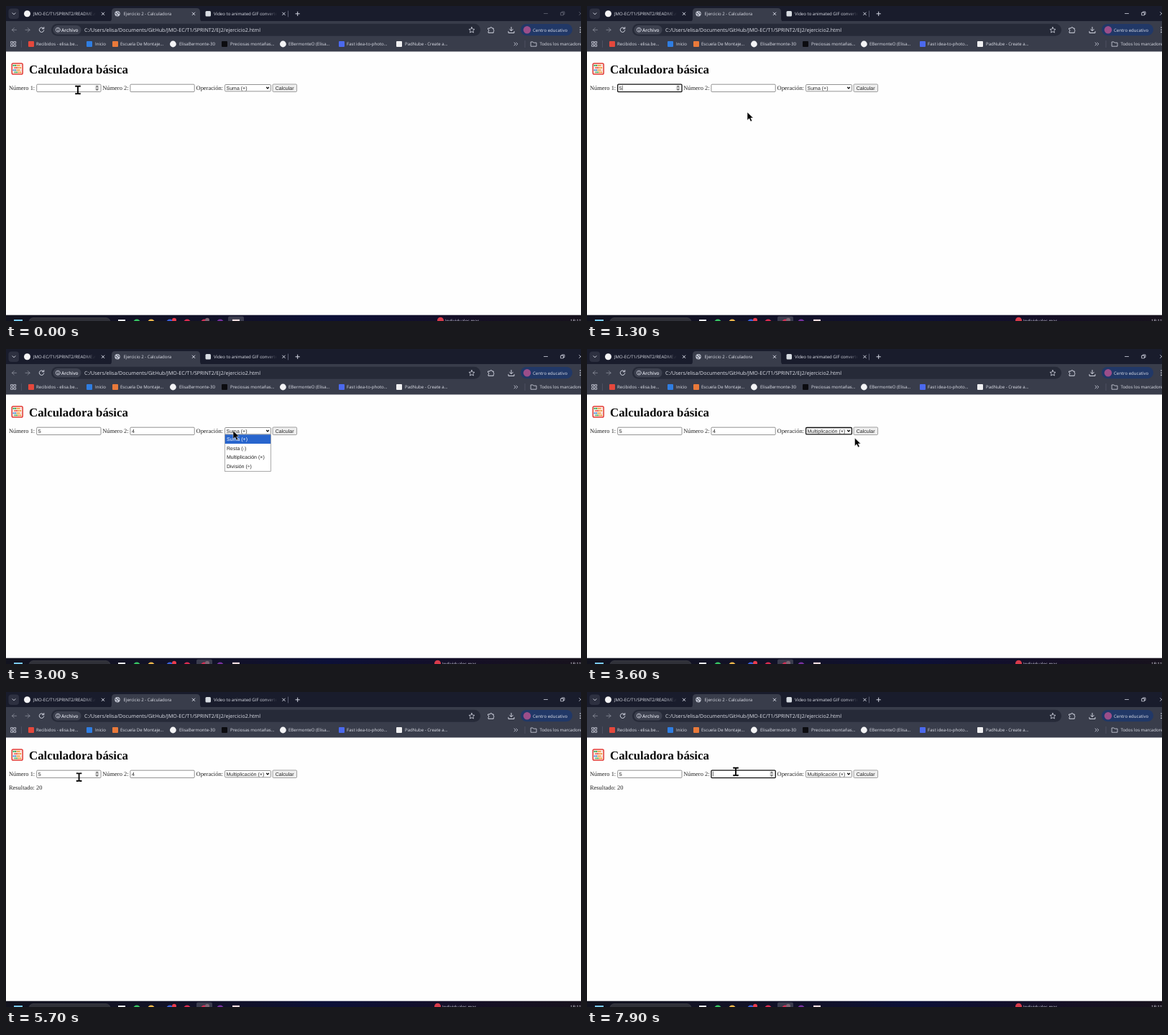
Recreate the animation shown at these times as an HTML page. Size 800 px wide and 439 px high, loop 8 s.

```html
<!DOCTYPE html>
<html lang="es">
<head>
<meta charset="utf-8">
<title>Calculadora</title>
<style>
  html, body { margin: 0; width: 100%; height: 100%; overflow: hidden; background: #fff; }
  svg { display: block; width: 100vw; height: 100vh; }
  text { white-space: pre; text-rendering: geometricPrecision; }
  .ui { font-family: "Open Sans", sans-serif; font-size: 6.07px; fill: #dfe1ea; }
  .serif { font-family: "Liberation Serif", serif; font-size: 8.42px; fill: #222; }
  .form { font-family: "Liberation Sans", sans-serif; font-size: 7px; fill: #222; }
  .line { fill: none; stroke: #d3d6e2; stroke-width: 1; stroke-linecap: round; stroke-linejoin: round; }
</style>
</head>
<body>
<svg viewBox="0 0 800 439" preserveAspectRatio="none">
  <defs>
    <linearGradient id="bar">
      <stop offset="0" stop-color="#12131f"/><stop offset=".42" stop-color="#11112a"/>
      <stop offset=".56" stop-color="#0c1038"/><stop offset=".8" stop-color="#150f26"/>
      <stop offset="1" stop-color="#17121d"/>
    </linearGradient>
    <linearGradient id="fadeStrip">
      <stop offset="0" stop-color="#191c2c" stop-opacity="0"/><stop offset="1" stop-color="#191c2c"/>
    </linearGradient>
  </defs>
  <g id="chrome"></g>
  <g id="page"></g>
  <g id="taskbar"></g>
  <g id="live"></g>
  <path id="arrow" d="M0 0V11.2L2.7 8.8L4.7 13L6.7 12L4.8 8H8.3Z" fill="#050505" stroke="#fff" stroke-width=".5"/>
  <path id="beam" d="M-3.8 -5.3H-1L0 -4.6L1 -5.3H3.8M0 -4.6V4.6M-3.8 5.3H-1L0 4.6L1 5.3H3.8" fill="none" stroke="#080808" stroke-width="1.9"/>
</svg>
<script>
const LOOP = 8000;
const $ = id => document.getElementById(id);

const rect = (x, y, w, h, fill, r = 0, extra = "") =>
  `<rect x="${x}" y="${y}" width="${w}" height="${h}" rx="${r}" fill="${fill}" ${extra}/>`;
const circle = (x, y, r, fill) => `<circle cx="${x}" cy="${y}" r="${r}" fill="${fill}"/>`;
const text = (x, y, s, cls, extra = "") => `<text x="${x}" y="${y}" class="${cls}" ${extra}>${s}</text>`;
const line = (d, extra = "") => `<path class="line" d="${d}" ${extra}/>`;
const cross = x => line(`M${x - 1.8} 9l3.6 3.6m0 -3.6l-3.6 3.6`, 'stroke-width=".9"');
const globe = (x, y) => circle(x, y, 3.7, "#c3c7d4") +
  `<path d="M${x - 3} ${y - 1}l2 1l1 2l-1 1M${x} ${y - 3}l1 2l2 .6" fill="none" stroke="#454957" stroke-width="1"/>`;

function drawChrome() {
  const bookmarks = [
    [31, 42, "Recibidos - elisa.be…", "#e5483c", 0],
    [112, 124, "Inicio", "#2f7de1", 0],
    [148, 159, "Escuela De Montaje…", "#e9793a", 0],
    [228, 241, "ElisaBermonte-30", "#f4f4f6", 1],
    [300, 312, "Preciosas montañas…", "#0c0c10", 0],
    [381, 393, "EBermonteO (Elisa…", "#f4f4f6", 1],
    [463, 474, "Fast idea-to-photo…", "#4b69ee", 0],
    [543, 555, "PadNube - Create a…", "#f0f0f2", 0],
  ];
  const mark = (x, color, round) => round ? circle(x + 4.4, 53, 4.4, color) : rect(x, 49, 8, 8, color, 1);

  $("chrome").innerHTML =
    rect(0, 0, 800, 22, "#191c2c") + rect(0, 21, 800, 43, "#393d4b") +
    // tab strip
    rect(3.5, 3.5, 14.5, 14.5, "#2d3040", 4) + line("M9 9.8l2 2l2 -2") +
    circle(29.5, 10.8, 4.5, "#f4f4f6") + text(38, 13, "JMO-EC/T1/SPRINT2/README.md", "ui") +
    rect(108, 5, 17, 12, "url(#fadeStrip)") + rect(125, 5, 12, 12, "#191c2c") + cross(135) +
    '<path d="M143 22Q147 22 147 17V8Q147 3 152 3H265Q270 3 270 8V17Q270 22 274 22Z" fill="#393d4b"/>' +
    globe(155, 10.8) + text(163.5, 13, "Ejercicio 2 - Calculadora", "ui") + cross(261) +
    rect(277.5, 7, 7.5, 7.5, "#d7dce2", 1.5) + text(289, 13, "Video to animated GIF converter", "ui") +
    rect(361, 5, 16, 12, "url(#fadeStrip)") + rect(377, 5, 14, 12, "#191c2c") + cross(386.5) +
    line("M392.5 7V15", 'stroke="#5a5e70" style="stroke:#5a5e70"') +
    line("M403 10.8h5.4m-2.7 -2.7v5.4") +
    // navigation
    line("M14.5 33.3H8.5m2.8 -2.8l-2.8 2.8l2.8 2.8M27 33.3h6m-2.8 -2.8l2.8 2.8l-2.8 2.8", 'opacity=".42"') +
    line("M52.2 31.2A3.3 3.3 0 1 0 52.8 34M52.8 29.6V31.8H50.4") +
    rect(63, 24.7, 597, 17, "#262a38", 8.5) + rect(65.5, 27, 39, 12.6, "#3d414f", 6.3) +
    line("M72.3 33.2v1.8m0 -3.7v.2", 'stroke-width=".7"') +
    '<circle class="line" cx="72.3" cy="33.2" r="3" style="stroke-width:.8"/>' +
    text(77, 35.5, "Archivo", "ui", 'font-weight="600" style="font-size:6.5px"') +
    text(109, 36, "C:/Users/elisa/Documents/GitHub/JMO-EC/T1/SPRINT2/EJ2/ejercicio2.html", "ui", 'style="font-size:7.13px"') +
    line("M648 29.5l1.15 2.6l2.8 .3l-2.1 1.9l.6 2.8l-2.45 -1.4l-2.45 1.4l.6 -2.8l-2.1 -1.9l2.8 -.3z", 'style="stroke-width:.8"') +
    line("M671 31H673.4a1.4 1.4 0 0 1 2.8 0H678.2V33.2a1.4 1.4 0 0 1 0 2.4V37.3H671V35.4a1.4 1.4 0 0 0 0 -2.6Z") +
    line("M703 29.5v5m-2.2 -2l2.2 2.2l2.2 -2.2M699 35.5V37.5H707V35.5") +
    rect(716, 25, 72, 16.2, "#213867", 8.1) + circle(725, 33.2, 5.2, "#9b4e8a") +
    text(733, 35.6, "Centro educativo", "ui") +
    [30, 33.2, 36.4].map(y => circle(799, y, .8, "#dfe1ea")).join("") +
    // bookmarks
    [7, 11.2].map(x => [49.6, 53.8].map(y => line(`M${x} ${y}h2.5v2.5h-2.5z`, 'style="stroke-width:.8"')).join("")).join("") +
    line("M21.5 48.5V57.5", 'style="stroke:#5d6171;stroke-width:.6"') +
    bookmarks.map(([ix, tx, label, color, round]) => mark(ix, color, round) + text(tx, 55.1, label, "ui")).join("") +
    line("M707 51l2 2l-2 2m2.8 -4l2 2l-2 2", 'style="stroke-width:.8"') +
    line("M722 48.5V57.5", 'style="stroke:#5d6171;stroke-width:.6"') +
    line("M730.5 50h2.5l1 1.2h4v5h-7.5z", 'style="stroke-width:.8"') +
    text(742.5, 55.1, "Todos los marcadores", "ui");
}

function drawPage() {
  const beadRows = [["#2fae5b", 83], ["#e8524a", 86.2], ["#3f8fe0", 89.4], ["#49b867", 92.4]];
  const beads = beadRows.map(([color, y], row) =>
    line(`M9 ${y}H22`, 'style="stroke:#d8a08c;stroke-width:.6"') +
    [0, 1, 2, 3].map(i => circle(10.6 + i * 2.5 + (row % 2) * 2, y, 1.15, i > 1 ? "#f09a3a" : color)).join("")).join("");

  $("page").innerHTML = rect(0, 63.5, 800, 368, "#fefefe") +
    rect(8.2, 80, 15, 15, "#fff2ec", 1.8, 'stroke="#e23a35" stroke-width="1.5"') + beads +
    text(32, 93.7, "Calculadora básica", "serif", 'font-weight="700" style="font-size:16.84px;fill:#080808"') +
    text(4, 117, "Número 1:", "serif") + text(134.3, 117, "Número 2:", "serif") +
    text(264.6, 117, "Operación:", "serif") +
    rect(371, 109, 33.6, 10.6, "#efefef", 1.4, 'stroke="#777" stroke-width=".7"') +
    text(374.8, 116.7, "Calcular", "form");
}

function drawTaskbar(active) {
  const icons = [[182, "#37c463"], [202, "#eab54a"], [228, "#3c62d8"], [252, "#d92c50"],
    [276, "#cf3156"], [298, "#77319e"]];
  $("taskbar").innerHTML = rect(0, 430.7, 800, 9, "url(#bar)") +
    rect(11, 437, 12, 4, "#79c8ee") + rect(32, 434.5, 113, 12, "#303139", 6, 'stroke="#4a4b52" stroke-width=".5"') +
    rect(active ? 265 : 309, 432.5, 22, 10, "#3b3c4e", 2) +
    rect(156, 437, 10, 4, "#eceef2") + icons.map(([x, c]) => circle(x, 441.5, 5, c)).join("") +
    circle(234, 437.8, 3, "#ea3d4e") + circle(280, 437.8, 3, "#7d6674") +
    rect(315, 436.8, 10, 4, "#efd9dc") + text(785, 441, "18:11", "ui");
}

const smooth = k => k * k * (3 - 2 * k);
// time, x, y of the pointer's hot spot
const route = [
  [0, 100, 117], [950, 100, 117], [1300, 223, 148], [1400, 223, 146], [1700, 220, 116], [2300, 220, 116],
  [2700, 316, 114], [3050, 316, 114], [3350, 318, 149], [3600, 372.5, 124], [3800, 384, 116],
  [4100, 384, 116], [4550, 36, 141], [4900, 122, 132], [5300, 124, 133], [5800, 99, 117],
  [6700, 99, 117], [7200, 207, 111], [8000, 207, 111],
];
function pointerAt(t) {
  const i = Math.max(1, route.findIndex(p => p[0] > t));
  const [a, b] = [route[i - 1], route[i]];
  const k = smooth((t - a[0]) / (b[0] - a[0]));
  return [a[1] + (b[1] - a[1]) * k, a[2] + (b[2] - a[2]) * k];
}

const within = (t, from, to) => t >= from && t < to;
const border = focused => focused
  ? 'stroke="#101010" stroke-width="1.3"' : 'stroke="#777" stroke-width=".8"';

function field(x, value, focused, hovered) {
  const spinner = focused || hovered
    ? rect(x + 81, 110, 6, 8.6, "#eeeeee") +
      `<path d="M${x + 81.6} 113.4l2.4 -3l2.4 3zM${x + 81.6} 115.2l2.4 3l2.4 -3z" fill="#777"/>` : "";
  const caret = focused ? rect(x + 2.2 + value.length * 4, 110.7, .6, 7, "#222") : "";
  return rect(x, 109.2, 89.3, 10.4, "#fff", 1.2, border(focused)) +
    text(x + 2, 116.7, value, "form") + spinner + caret;
}

const options = ["Suma (+)", "Resta (-)", "Multiplicación (×)", "División (÷)"];
function dropdown(y) {
  const hovered = Math.max(0, Math.min(3, Math.floor((y - 119.2) / 12.6)));
  return rect(304.4, 119.2, 64, 51.3, "#fff", 0, 'stroke="#888" stroke-width=".7"') +
    options.map((label, i) => {
      const top = 119.4 + i * 12.6, on = i === hovered;
      return (on ? rect(304.8, top, 63.4, 12.6, "#2865cd") : "") +
        text(307, top + 8.8, label, "form", on ? 'style="fill:#fff"' : "");
    }).join("");
}

let wasActive = null;
function render(time) {
  const t = Math.floor(time % LOOP / 100) * 100;
  const [x, y] = pointerAt(t);
  const over = left => within(x, left, left + 89) && within(y, 108.5, 120);
  const active = t >= 500;
  if (active !== wasActive) drawTaskbar(wasActive = active);

  const newsX = 611 - 4 * Math.min(1, t / 400);
  const chosen = t < 3400 ? options[0] : options[2];
  $("live").innerHTML =
    `<g opacity="${active ? 1 : .4}">` +
      line("M748.5 10.5h5", 'style="stroke-width:.8"') +
      line("M772 9.2h3.6v3.6h-3.6zM773.3 9.2V8H777V11.6H775.6", 'style="stroke-width:.8"') +
      line("M797.5 8.5l4 4m0 -4l-4 4", 'style="stroke-width:.8"') + "</g>" +
    circle(newsX - 6.5, 438.2, 4.5, "#d83b4b") + text(newsX, 441, "Individuales mas…", "ui") +
    field(42.7, within(t, 900, LOOP) ? "5" : "", within(t, 400, 1700) || within(t, 5900, 7300), over(42.7)) +
    field(172.9, within(t, 2100, 7600) ? "4" : "", within(t, 1700, 2700) || t >= 7300, over(172.9)) +
    rect(304.6, 109.5, 63.8, 9.4, "#fff", 1.2, border(within(t, 3400, 4000))) +
    text(306.5, 116.7, chosen, "form") +
    '<path d="M362.2 113l1.8 2l1.8 -2" fill="none" stroke="#111" stroke-width="1.2"/>' +
    (t >= 4000 ? text(4, 136, "Resultado: 20", "serif") : "") +
    (within(t, 2700, 3400) ? dropdown(y) : "");

  const typing = over(42.7) || over(172.9);
  for (const [id, shown] of [["arrow", !typing], ["beam", typing]]) {
    $(id).setAttribute("transform", `translate(${x} ${y})`);
    $(id).style.display = shown ? "" : "none";
  }
}

drawChrome();
drawPage();
const start = performance.now();
function tick() {
  render(performance.now() - start);
  requestAnimationFrame(tick);
}
tick();
</script>
</body>
</html>
```
